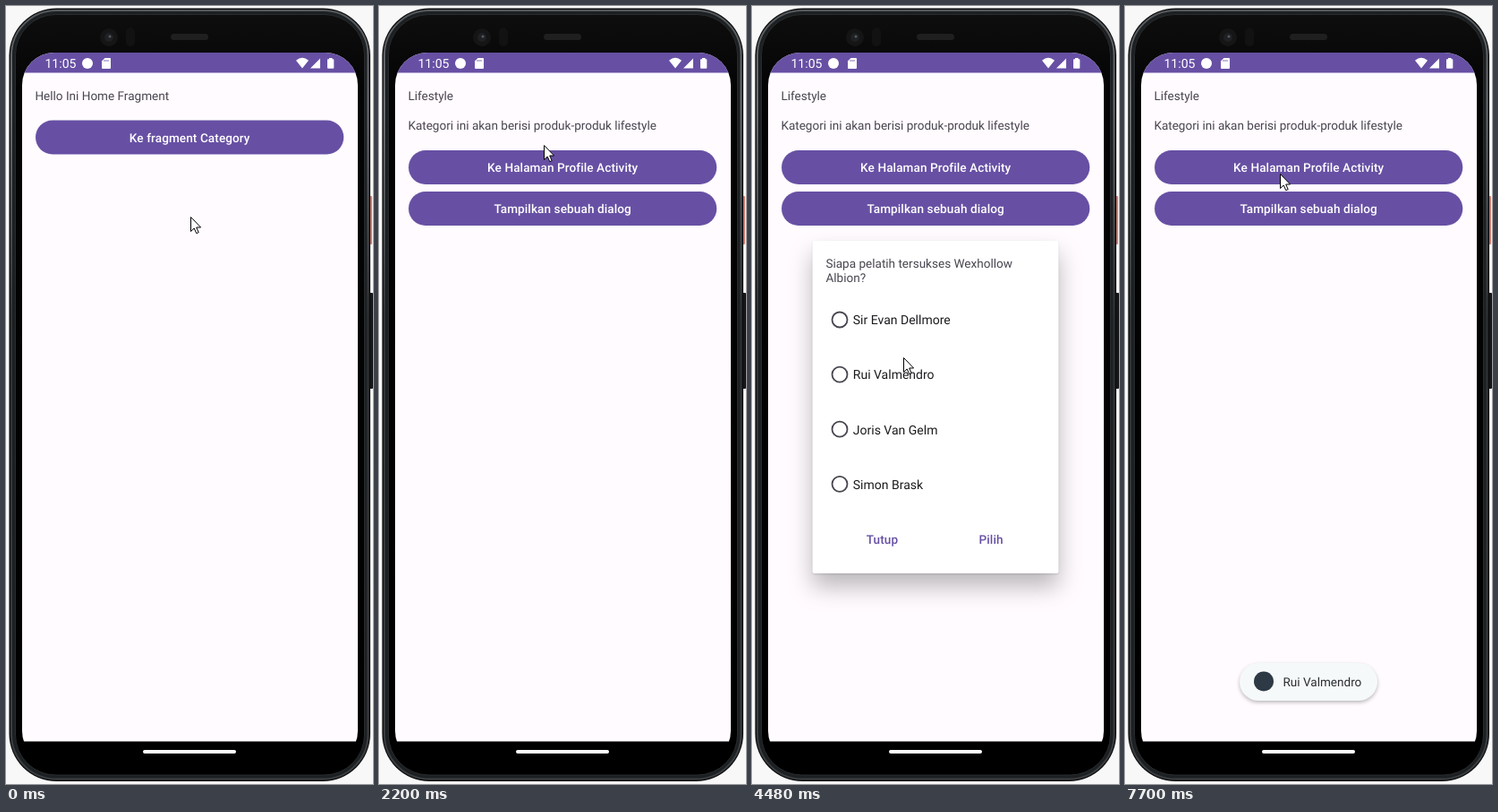
Recreate the animation shown at these times as an HTML page. Size 410 by 868 pixels, loop 8 s.

```html
<!DOCTYPE html>
<html lang="id">
<head>
<meta charset="utf-8">
<title>Fragment dan dialog</title>
<style>
  html, body { margin: 0; width: 100%; height: 100%; overflow: hidden; background: #f8f8f8; }
  svg { display: block; width: 410px; height: 868px; }
  text { font: 400 13.55px Roboto, sans-serif; fill: #49454f; text-rendering: geometricPrecision; }
  .label { font-weight: 500; letter-spacing: .1px; fill: #fff; text-anchor: middle; }
  .action { font-weight: 500; letter-spacing: .1px; fill: #6750a4; }
  .option { font-size: 14px; fill: #1c1b1f; }
  .pill { fill: #6750a4; }
  #dialog { transform-origin: 205px 447px; }
  #sheet { filter: drop-shadow(0 1px 1px #0002) drop-shadow(0 15px 13px #0004); }
  #toastBox { filter: drop-shadow(0 2px 2px #0004); }
</style>
</head>
<body>
<svg viewBox="0 0 410 868">
  <defs>
    <clipPath id="screen"><rect x="18" y="52" width="375" height="793" rx="36"/></clipPath>
    <radialGradient id="glow">
      <stop offset="0" stop-color="#fff" stop-opacity=".27"/>
      <stop offset=".45" stop-color="#fff" stop-opacity=".22"/>
      <stop offset="1" stop-color="#fff" stop-opacity="0"/>
    </radialGradient>
    <linearGradient id="rim" x2="0" y2="1">
      <stop offset="0" stop-color="#55585b"/>
      <stop offset=".12" stop-color="#6a6e71"/>
      <stop offset=".4" stop-color="#2f3234"/>
      <stop offset="1" stop-color="#3b3e40"/>
    </linearGradient>
    <linearGradient id="bezel" x2="0" y2="1">
      <stop offset="0" stop-color="#0e0e0e"/>
      <stop offset=".1" stop-color="#040404"/>
      <stop offset="1" stop-color="#000"/>
    </linearGradient>
  </defs>

  <!-- phone body -->
  <rect x="404" y="212" width="5" height="54" rx="1" fill="#cf7d72"/>
  <rect x="404" y="320" width="6" height="107" rx="1" fill="#151617"/>
  <rect x="3.5" y="2.5" width="403.5" height="862.5" rx="53" fill="#0b0c0d"/>
  <rect x="6" y="5" width="398.5" height="857.5" rx="50" fill="#1d2022" stroke="url(#rim)" stroke-width="2"/>
  <rect x="10.5" y="9.5" width="390" height="848.5" rx="45" fill="url(#bezel)" stroke="#292c2e"/>
  <circle cx="115" cy="35" r="10" fill="#151515"/>
  <circle cx="115" cy="35" r="5" fill="#1e2023"/>
  <circle cx="116" cy="34" r="1.5" fill="#555b60"/>
  <rect x="134" y="24" width="10" height="21" rx="5" fill="#121212"/>
  <rect x="184" y="31" width="42" height="7" rx="3.5" fill="#1f1f1f"/>

  <g clip-path="url(#screen)">
    <rect x="18" y="52" width="375" height="768.5" fill="#fffbff"/>
    <rect x="18" y="52" width="375" height="22.5" fill="#6750a4"/>
    <g fill="#fff">
      <text x="43.5" y="69" style="font-size:14px;fill:#fff">11:05</text>
      <circle cx="91" cy="64" r="6"/>
      <path d="M110.5 58H116a1 1 0 0 1 1 1V69a1 1 0 0 1-1 1H108a1 1 0 0 1-1-1V61.5Z"/>
      <path d="M324 60.7Q331 55 338 60.7L331 69.5ZM340 69.5L351 58.5V69.5ZM359 60a.8.8 0 0 1 .8-.8H361V58h3.5v1.2h1a.8.8 0 0 1 .8.8V69a.8.8 0 0 1-.8.8H359.8a.8.8 0 0 1-.8-.8Z"/>
    </g>
    <path d="M110 60v2M112 60v2M114 60v2" stroke="#6750a4" stroke-width=".8"/>

    <g id="home">
      <text x="32.4" y="104.6">Hello Ini Home Fragment</text>
    </g>
    <g id="category">
      <text x="32.4" y="104.6">Lifestyle</text>
      <text x="32.4" y="138.2">Kategori ini akan berisi produk-produk lifestyle</text>
    </g>
    <g id="dialog">
      <rect id="sheet" x="67.5" y="262" width="275" height="371" rx="2" fill="#fff"/>
      <text x="82.4" y="292">Siapa pelatih tersukses Wexhollow</text>
      <text x="82.4" y="308">Albion?</text>
      <rect id="press" x="226" y="576" width="84" height="37" rx="18.5" fill="#6750a4"/>
      <text class="action" x="127.7" y="599.7">Tutup</text>
      <text class="action" x="253.5" y="599.7">Pilih</text>
    </g>
    <g id="toast">
      <rect id="toastBox" x="128" y="733" width="154" height="42" rx="21" fill="#f6f9fa"/>
      <circle cx="155" cy="753.5" r="11" fill="#2d3945"/>
      <text x="176.5" y="759" style="fill:#2b2d30">Rui Valmendro</text>
    </g>
  </g>
  <rect x="153" y="830" width="104" height="4" rx="2" fill="#fff"/>
  <path id="cursor" d="M.5 .5V16.5L4.2 13l2.6 5.7 2.4-1.1L6.7 12H11.6Z" fill="#fff" stroke="#000"/>
</svg>
<script>
const LOOP = 8000;
const $ = id => document.getElementById(id);
const clamp = v => Math.max(0, Math.min(1, v));
const ramp = (t, from, to) => clamp((t - from) / (to - from));
const smooth = v => v * v * (3 - 2 * v);

function add(parent, tag, attrs, text = '') {
  const el = document.createElementNS('http://www.w3.org/2000/svg', tag);
  for (const key in attrs) el.setAttribute(key, attrs[key]);
  el.textContent = text;
  return parent.appendChild(el);
}

// Adds a pill button and returns a function that draws its touch ripple.
function addButton(parent, y, label, id) {
  const box = { x: 33, y, width: 344.3, height: 38, rx: 19 };
  add(parent, 'rect', { ...box, class: 'pill' });
  const clip = add(parent, 'clipPath', { id });
  add(clip, 'rect', box);
  const layer = add(parent, 'g', { 'clip-path': `url(#${id})` });
  const glow = add(layer, 'circle', { cx: 199, cy: y + 19, fill: 'url(#glow)' });
  add(parent, 'text', { class: 'label', x: 205.2, y: y + 24 }, label);
  return (t, start) => {
    glow.setAttribute('r', t < start ? 0 : 65 + (t - start) * .86);
    glow.setAttribute('opacity', 1 - ramp(t, start + 200, start + 480));
  };
}

const rippleHome = addButton($('home'), 127.5, 'Ke fragment Category', 'clipHome');
addButton($('category'), 161, 'Ke Halaman Profile Activity', 'clipProfile');
const rippleDialog = addButton($('category'), 207, 'Tampilkan sebuah dialog', 'clipDialog');

const coaches = ['Sir Evan Dellmore', 'Rui Valmendro', 'Joris Van Gelm', 'Simon Brask'];
const rings = coaches.map((name, i) => {
  const cy = 350 + 61.1 * i;
  add($('dialog'), 'text', { class: 'option', x: 112.8, y: cy + 5.3 }, name);
  return add($('dialog'), 'circle', { cx: 98, cy, r: 8.5, fill: 'none', stroke: '#49454f', 'stroke-width': 1.8 });
});
const dot = add($('dialog'), 'circle', { cx: 98, cy: 411.1, fill: '#6750a4' });
const halo = add($('dialog'), 'circle', { cx: 98, cy: 411.1, fill: '#6750a4' });

// Pointer stops: time, x, y
const stops = [
  [520, 206, 235], [920, 185, 155], [1190, 184, 155], [2530, 184, 155], [3120, 187, 225],
  [3860, 187, 225], [4480, 169, 392], [4620, 172, 402], [4690, 154, 391], [4960, 154, 391],
  [5120, 178, 425], [5250, 220, 455], [5450, 235, 560], [5570, 245, 587], [5660, 254, 594],
  [6720, 254, 594], [7210, 176, 251], [7480, 176, 251], [7700, 173, 187]
];

function pointer(t) {
  const i = stops.findIndex(s => s[0] > t);
  if (i === 0) return stops[0].slice(1);
  if (i < 0) return stops.at(-1).slice(1);
  const [a, b] = [stops[i - 1], stops[i]];
  const k = smooth(ramp(t, a[0], b[0]));
  return [a[1] + (b[1] - a[1]) * k, a[2] + (b[2] - a[2]) * k];
}

function draw(t) {
  $('cursor').setAttribute('transform', `translate(${pointer(t)})`);

  $('home').style.display = t < 2130 ? '' : 'none';
  $('category').style.display = t < 2130 ? 'none' : '';
  rippleHome(t, 2060);
  rippleDialog(t, 3180);

  const open = smooth(ramp(t, 3390, 3560));
  $('dialog').style.opacity = open * (1 - ramp(t, 6030, 6180));
  $('dialog').style.transform = `scale(${.94 + .06 * open})`;

  const picked = ramp(t, 4830, 4980);
  rings[1].setAttribute('stroke', picked ? '#6750a4' : '#49454f');
  dot.setAttribute('r', 4.6 * picked);
  halo.setAttribute('r', 16 * smooth(picked));
  halo.setAttribute('opacity', .12 * (1 - ramp(t, 4980, 5250)));
  $('press').setAttribute('opacity', .12 * ramp(t, 5900, 5970));

  const shown = smooth(ramp(t, 6110, 6390));
  $('toast').style.opacity = shown;
  $('toast').style.transform = `translateY(${12 * (1 - shown)}px)`;
}

const begin = performance.now();
function tick() {
  draw((performance.now() - begin) % LOOP);
  requestAnimationFrame(tick);
}
tick();
</script>
</body>
</html>
```
